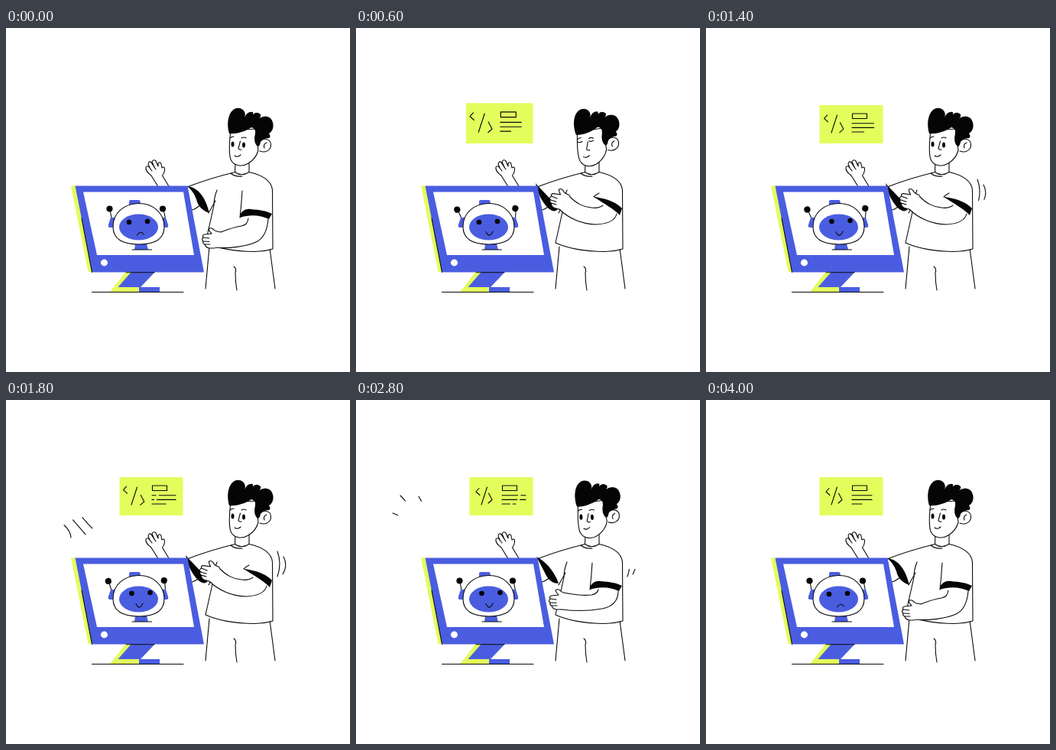
Recreate the animation shown at these times as an HTML page. Size 450x450 px, loop 4040 ms.

```html
<!DOCTYPE html>
<html lang="en">
<head>
<meta charset="utf-8">
<title>Robot on a screen</title>
<style>
html, body { margin: 0; width: 100%; height: 100%; overflow: hidden; background: #fff; }
svg { display: block; width: 100vw; height: 100vh; }
.ln, .sk { stroke: #0a0a0a; stroke-width: 1.1; stroke-linecap: round; stroke-linejoin: round; }
.ln { fill: none; }
.sk, .w { fill: #fff; }
.k { fill: #050505; }
.b { fill: #4a5de0; }
.y { fill: #e3fd5c; }
</style>
</head>
<body>
<svg viewBox="0 0 450 450">
  <g id="card">
    <path class="y" d="M148.500 101H231.500V151H148.500Z"/>
    <path class="ln" id="lt" d="M161 115.500L157 120L162 124.500"/>
    <path class="ln" d="M171.500 114L164 137"/>
    <path class="ln" id="gt" d="M173.500 122L178 130.500L173 135"/>
    <path class="ln" d="M191.500 112H210.500V118.500H191.500Z"/>
    <path class="ln" id="rows"/>
  </g>

  <!-- motion marks -->
  <g class="ln">
    <path class="ray" pathLength="1" d="M85 180Q84 162 48 148"/>
    <path class="ray" pathLength="1" d="M104 176Q84 152 58 125"/>
    <path class="ray" pathLength="1" d="M113 168Q96 152 82 126"/>
    <path class="arc" pathLength="1" d="M355 198Q361 214 355 231"/>
    <path class="arc" pathLength="1" d="M363 205Q369 216 362 228"/>
  </g>

  <!-- raised hand -->
  <g id="wave">
    <path class="sk" d="M208 222L190 193Q182 187 183 182Q185 179 188 183L186 178Q187 173 190 176L194 182L191 175Q193 171 196 174L199 181L199 177Q202 174 203 178L204 183Q208 180 207.500 186Q207 190 204.500 193L222 222"/>
    <path class="ln" d="M188 183L191 187M194 182L196 185"/>
  </g>

  <!-- legs and shirt -->
  <path class="ln" d="M266 286L261 341M345 288L352 341M298 312Q302 315 300 320Q300 332 302 343M241 239Q248 237 254 232"/>
  <path class="w" d="M300 188C275 194 255 202 237 208L265 242L273 226L261 281Q296 294 349 289L348 212Q346 196 318 188Z"/>
  <path class="ln" d="M300 188.500C277 194 255 201 237 208M276 212Q272 222 272 232L261 281Q285 292 325 292.500Q340 292 349 289L348.500 212Q347 195 318 188.500M274 226L265 242"/>
  <path class="k" id="cuff"/>

  <!-- neck and head -->
  <path class="sk" d="M300 174L299.500 188.500Q308 195 318 188.500L318 172"/>
  <path class="ln" d="M294 190Q300 195 309 194"/>
  <g id="head">
    <path class="sk" d="M294 134C292 150 291 163 294 172C298 181 309 182 317 177Q327 171 330 160L327 132Z"/>
    <path class="sk" d="M332 148C337 143 346 145 346.500 152C347 160 339 164 332 161"/>
    <path class="ln" d="M341 150Q336 152 338 157"/>
    <path class="k" d="M292 138C288 124 291 108 301 105C310 103 315 111 312 117Q316 108 323 110Q324 113 320 117Q326 107 333 113Q334 116 331 118Q340 113 346 118C352 125 350 135 344 138Q347 142 344 144Q337 144 333 149Q332 155 329 155Q323 149 326 138Q327 131 321 130C312 136 300 139 292 138Z"/>
    <path class="ln" d="M306.500 148L304 157.500Q305 160 308 159M299 167Q303 170 307 166M293 144Q295 142 298 142M308 144Q311 142 314 144"/>
    <g class="k" id="eyes"><ellipse cx="296.500" cy="152" rx="2" ry="3.600"/><ellipse cx="311" cy="153" rx="2" ry="3.600"/></g>
    <path class="ln" id="lids" d="M293 147Q296 149 299 147M308 147Q311 149 314 147"/>
  </g>

  <!-- front arm -->
  <path class="w" id="armFill"/>
  <path class="ln" id="armLine"/>
  <path class="k" id="sleeve"/>
  <path class="ln" id="fold"/>
  <g id="hand">
    <path class="sk" d="M281 267C276 266 273 266 272 264Q268 260 265 263Q266 266 269 269L260 270Q256 271 258 274Q255 277 258 279Q257 282 260 283Q261 287 266 288L273 288"/>
    <path class="ln" d="M258 274L266 275M258 279L266 279.500M260 283L267 283"/>
  </g>

  <!-- monitor -->
  <path class="y" d="M85 206.500H91L114 319H107.500Z"/>
  <path class="b" d="M90.500 206.500H237.500L259 319.500H112.500Z"/>
  <path class="w" d="M101 214.500H232L246 297H119Z"/>
  <path class="ln" d="M99 249L112.500 319.500"/>
  <ellipse class="w" cx="128.500" cy="307" rx="4.600" ry="4.400"/>
  <path class="y" d="M156 319.500H165L148 339H175V345.500H136Z"/>
  <path class="b" d="M164 319H195L176 339H201V345.500H174V339H146.500Z"/>
  <path class="ln" d="M157 319.800H194M112.500 345.500H232"/>

  <!-- robot -->
  <g id="antL"><path class="ln" d="M138 249L136 237"/><circle class="k" cx="135.500" cy="236.500" r="4.100"/></g>
  <g id="antR"><path class="ln" d="M208.500 249L206 237"/><circle class="k" cx="205" cy="236.500" r="4.100"/></g>
  <path class="b" d="M137 248H142V261H136Q133 261 134 257ZM205 248H209L212 257Q213 261 210 261H205ZM161 231V227Q161 225 163 225H174Q176 225 176 231ZM169 282H184L186 290H168Z"/>
  <path class="ln" d="M165 290H190.500"/>
  <path class="sk" d="M173 229.500C192 229 207 242 207 260C207 275 197 283 174 283C151 283 140 275 140 260C140 242 154 230 173 229.500Z"/>
  <ellipse class="b" cx="173.500" cy="260.500" rx="25.500" ry="17"/>
  <g class="k" id="robotEyes"><circle cx="161" cy="254" r="3.300"/><circle cx="185" cy="253" r="3.300"/></g>
  <path class="ln" id="mouth"/>
</svg>
<script>
const LOOP = 4040;
const $ = id => document.getElementById(id);
const set = (id, name, value) => $(id).setAttribute(name, value);
const lerp = (a, b, k) => a + (b - a) * k;
const linear = (t, from, to) => Math.min(1, Math.max(0, (t - from) / (to - from)));
const ease = (t, from, to) => { const k = linear(t, from, to); return k * k * (3 - 2 * k); };
// Rises over a..b, holds, falls over c..d.
const bump = (t, a, b, c, d) => ease(t, a, b) - ease(t, c, d);
const swing = (t, peak, period) => Math.cos(2 * Math.PI * (t - peak) / period);

// Blends two strings that differ only in their numbers.
function mix(a, b, k) {
  const to = b.match(/-?[\d.]+/g);
  let i = 0;
  return a.replace(/-?[\d.]+/g, n => lerp(+n, +to[i++], k).toFixed(2));
}

// Arm poses: low, half way, raised.
const ARM = {
  top: ['M317 249C316 256 313 258 308 259C296 261 289 264 281 267',
        'M317 248C316 252 314 254 308 255C298 256 288 255 277 253',
        'M323 232C319 235 314 236 308 235C297 234 289 230 279 220'],
  low: ['M272 287C290 289 316 286 329 279C339 273 342 262 343 250',
        'M269 274C285 276 305 276 322 273C337 270 343 262 343 250',
        'M266 237C278 249 296 257 315 257C330 256 339 252 341 243'],
  sleeve: ['M306 248C306 240 313 236 320 237C332 238 340 239 348 243L344 250C332 244 318 244 306 248Z',
           'M306 248C306 240 313 236 320 237C332 238 340 239 348 243L344 250C332 244 318 244 306 248Z',
           'M311 221C312 221 315 221 318 222C330 224 342 229 348 236L345 245C338 237 325 230 311 221Z'],
  fold: ['M309 213Q308 230 306 248', 'M309 213Q308 230 306 248', 'M318 216Q314 218 311 221'],
  hand: ['translate(0 0) rotate(0 270 275)', 'translate(-4 -14) rotate(0 270 275)', 'translate(-3 -51) rotate(15 270 275)']
};
const CUFF = ['M237 207C250 208 261 220 266 242C257 239 251 233 249 224C246 216 242 211 237 207Z',
              'M235 203C243 213 255 222 264 237C259 243 251 237 245 228C240 220 237 213 235 203Z'];

function drawArm(t) {
  const raise = bump(t, 80, 540, 2480, 3120);
  const pose = raise * 2, i = Math.min(1, Math.floor(pose));
  const part = name => mix(ARM[name][i], ARM[name][i + 1], pose - i);
  const top = part('top'), low = part('low');
  set('armFill', 'd', top + low.replace('M', 'L') + 'Z');
  set('armLine', 'd', top + low);
  set('sleeve', 'd', part('sleeve'));
  set('fold', 'd', part('fold'));
  set('hand', 'transform', part('hand'));
  set('cuff', 'd', mix(...CUFF, raise));
  const lift = 11 * ease(swing(t, 975, LOOP / 3), 0, 1);
  set('wave', 'transform', `translate(${lift * .1} ${-lift})`);
}

function drawCard(t) {
  const size = 1.06 * ease(t, 160, 540) - .06 * ease(t, 560, 800);
  set('card', 'display', size > 0 ? 'inline' : 'none');
  set('card', 'transform', `translate(231.5 151) scale(${size}) translate(-231.5 -151)`);
  const spread = (2.75 + .75 * swing(t, 600, 1200)) * (1 - ease(t, 2380, 2800));
  set('lt', 'transform', `translate(${-spread} ${-spread * .7})`);
  set('gt', 'transform', `translate(${spread * .8} ${spread * .7})`);

  // A gap runs along each line of code, one after another.
  const stretch = 5 * bump(t, 1000, 1800, 2900, 3400);
  set('rows', 'd', [217, 217, 204].map((right, i) => {
    const y = 124.8 + i * 5.6, end = right + stretch;
    const gap = lerp(191, end, linear(t, 1400 + 200 * i, 3400));
    if (gap < 193 || gap > end - 3) return `M191 ${y}H${end}`;
    return `M191 ${y}H${gap - 1}M${gap + 3} ${y}H${Math.max(end, gap + 3)}`;
  }).join(''));
}

// Shows only the stretch from..to of each path.
function trim(name, from, to) {
  for (const path of document.getElementsByClassName(name)) {
    path.style.display = to - from > .01 ? 'inline' : 'none';
    path.style.strokeDasharray = `${to - from} 2`;
    path.style.strokeDashoffset = -from;
  }
}

function drawFaces(t) {
  const nod = 5 * bump(t, 160, 560, 640, 940) + 3.7 * bump(t, 1900, 2320, 2820, 3400);
  set('head', 'transform', `rotate(${-nod} 314 185)`);
  const shut = t > 530 && t < 690;
  set('eyes', 'display', shut ? 'none' : 'inline');
  set('lids', 'display', shut ? 'inline' : 'none');
  const tilt = bump(t, 60, 560, 2340, 2790) * (11 + 4 * swing(t, 600, 860));
  set('antL', 'transform', `rotate(${-tilt} 138 249)`);
  set('antR', 'transform', `rotate(${tilt} 208.5 249)`);
  const look = bump(t, 640, 900, 3260, 3540);
  set('robotEyes', 'transform', `translate(${3.5 * look} ${-look})`);
  set('mouth', 'd', mix('M171.5 271Q175.5 264 180.5 270', 'M170 266.500Q174.500 276 179 266', bump(t, 140, 420, 3260, 3540)));
}

function draw(t) {
  drawArm(t);
  drawCard(t);
  drawFaces(t);
  trim('ray', linear(t, 1800, 2960), linear(t, 1400, 2480));
  trim('arc', linear(t, 1960, 3160), linear(t, 900, 1500));
}

const start = performance.now();
function tick() {
  draw((performance.now() - start) % LOOP);
  requestAnimationFrame(tick);
}
tick();
</script>
</body>
</html>
```
